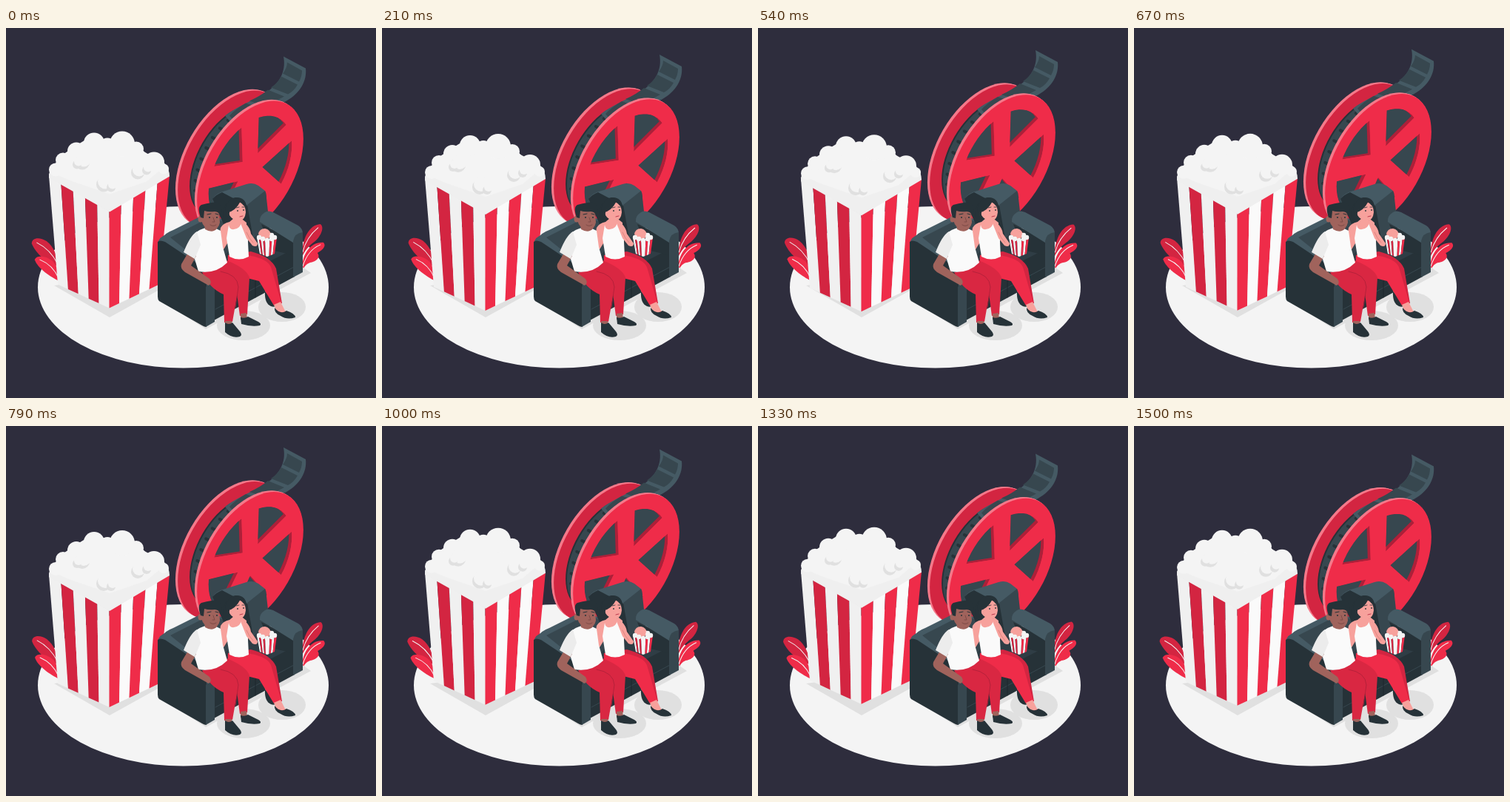
Recreate the animation shown at these times as an HTML page with a canvas. Size 500 px wide and 500 px high, loop 1.54 s.

```html
<!DOCTYPE html>
<html lang="en">
<head>
<meta charset="utf-8">
<title>Movie night</title>
<style>
html, body { margin: 0; width: 100%; height: 100%; overflow: hidden; background: #2e2d3d; }
canvas { display: block; width: 100vw; height: 100vh; object-fit: contain; }
</style>
</head>
<body>
<canvas id="stage" width="500" height="500"></canvas>
<script>
const ctx = document.getElementById('stage').getContext('2d');
const LOOP = 1540, TAU = Math.PI * 2;
const RED = '#ef2c49', DEEP = '#d32541', PINK = '#f5798a', MAROON = '#ad2039';
const INK = '#263238', COAL = '#2f3d45', SLATE = '#37474f', STEEL = '#455a64';
const PAPER = '#f4f4f4', SHADE = '#e0e0e0';
const BROWN = '#a0635c', DARK_BROWN = '#7d4a46', SKIN = '#f7a19c';

function shape(color, d) {
  ctx.fillStyle = color;
  ctx.fill(new Path2D(d));
}
function line(color, width, d) {
  ctx.strokeStyle = color;
  ctx.lineWidth = width;
  ctx.lineCap = ctx.lineJoin = 'round';
  ctx.stroke(new Path2D(d));
}
function oval(color, x, y, rx, ry = rx) {
  ctx.fillStyle = color;
  ctx.beginPath();
  ctx.ellipse(x, y, rx, ry, 0, 0, TAU);
  ctx.fill();
}
function group(dx, dy, draw) {
  ctx.save();
  ctx.translate(dx, dy);
  draw();
  ctx.restore();
}
function quad(color, points) {
  shape(color, 'M' + points.map(p => p.join(' ')).join('L') + 'Z');
}
const mix = (a, b, k) => a.map((v, i) => v + (b[i] - v) * k);

// Cosine that peaks at the given time, once per loop.
const swing = (t, peak) => Math.cos(TAU * (t - peak) / LOOP);

// Striped face between a top edge (a-b) and a bottom edge (c-d).
function stripes(a, b, c, d, count, colors) {
  for (let i = 0; i < count; i++) {
    const s = i / count, e = (i + 1) / count;
    quad(colors[i % 2], [mix(a, b, s), mix(a, b, e), mix(c, d, e), mix(c, d, s)]);
  }
}

function leaves(angle) {
  const sway = (x, y, draw) => group(x, y, () => {
    ctx.rotate(angle);
    ctx.translate(-x, -y);
    draw();
  });
  sway(72, 338, () => {
    shape(DEEP, 'M71 322C57 320 40 304 35 291C35 283 46 282 55 288C65 296 69 307 71 322Z');
    line(PAPER, 1, 'M42 290Q60 299 70 319');
    shape(RED, 'M72 342C60 336 43 325 39 313C41 306 56 308 64 316C70 324 72 331 72 342Z');
    line(PAPER, 1, 'M46 313Q63 320 71 338');
  });
  sway(402, 325, () => {
    shape(DEEP, 'M400 310C400 284 410 266 425 265C431 269 426 281 418 288C410 294 404 300 400 310Z');
    line(PAPER, 1, 'M422 270Q406 283 401 303');
    shape(RED, 'M400 330C399 305 412 289 429 290C434 295 427 301 421 304C426 311 418 316 411 317C405 319 402 324 400 330Z');
    line(PAPER, 1, 'M425 293Q408 300 401 322');
  });
}

// Reel discs live in the plane of the right isometric face.
const R = 83;
const iso = (r, a) => [r * Math.cos(a) * 0.866, -r * (Math.sin(a) + Math.cos(a) / 2)];
function disc(color, dx, dy, r) {
  ctx.save();
  ctx.transform(0.866, -0.5, 0, 1, dx, dy);
  oval(color, 0, 0, r);
  ctx.restore();
}
function thickDisc(color, dx, dy) {
  for (let i = 4; i >= 0; i--) disc(i ? PINK : color, dx - i * 0.8, dy - i * 0.45, R);
}
// Wedge that narrows to a point near the hub.
function windowPath(center) {
  const p = new Path2D(), half = 0.42;
  p.moveTo(...iso(20, center));
  for (let k = -1; k <= 1; k += 0.25) p.lineTo(...iso(65, center + half * k));
  p.closePath();
  return p;
}
function windows() {
  for (let i = 0; i < 5; i++) {
    const p = windowPath((54 + i * 72) * TAU / 360);
    ctx.save();
    ctx.clip(p);
    ctx.fillStyle = MAROON;
    ctx.fill(p);
    ctx.translate(-4, -2.2);
    ctx.fillStyle = SLATE;
    ctx.fill(p);
    ctx.restore();
  }
}
function filmTail() {
  shape(STEEL, 'M375 38L405 54C407 71 397 88 379 98C352 113 336 119 310 134L296 118C310 107 328 100 346 90C369 77 379 59 375 38Z');
  shape(SLATE, 'M380 46L400 57Q400 65 396 72L374 61Q380 53 380 46Z');
  shape(SLATE, 'M372 65L394 76Q389 85 381 89L358 80Q367 74 372 65Z');
  shape(SLATE, 'M354 83L376 92Q362 100 347 104L329 98Q343 92 354 83Z');
  shape(SLATE, 'M324 101L342 107Q322 114 308 125L302 118Q310 109 324 101Z');
}
function reel() {
  group(330, 191, () => {
    thickDisc(DEEP, -26, -14);
    for (let i = 0; i <= 10; i++) disc(i === 0 ? INK : SLATE, -23 + i * 1.8, -12 + i, 68);
    for (let i = 0; i < 9; i++) {
      const [x, y] = iso(67, 1.8 + i * 0.2);
      line(INK, 4, `M${x - 17} ${y - 9}L${x - 9} ${y - 5}`);
    }
  });
  filmTail();
  group(330, 191, () => {
    thickDisc(RED, 0, 0);
    windows();
  });
}

function popcorn() {
  const left = [58, 199], right = [221, 199], front = [139.5, 247];
  const baseLeft = [70, 346], baseRight = [207, 346], baseFront = [139.5, 378];
  stripes(left, front, baseLeft, baseFront, 5, ['#f0f0f0', DEEP]);
  stripes(front, right, baseFront, baseRight, 5, [RED, '#fafafa']);
  shape('#efefef', 'M58 202L58 197Q60 188 73 181L180 163L214 182Q221 190 221 200L140 248Z');
  shape(PAPER, 'M60 194L72 174L92 160L110 149L135 150L175 154L188 168L215 186L190 207L140 224L85 205Z');
  const puffs = [[67, 191, 9], [77, 178, 10], [95, 166, 12], [119, 155, 14], [137, 160, 12],
    [157, 156, 17], [176, 163, 10], [200, 181, 14], [213, 190, 7]];
  for (const [x, y, r] of puffs) oval(PAPER, x, y, r);
  for (const [x, y, r] of [[103, 181, 10], [96, 184, 6], [178, 195, 9], [190, 192, 6], [132, 211, 10], [142, 215, 6]]) {
    oval(SHADE, x, y, r);
    oval(PAPER, x + 2, y - 4, r);
  }
}

function sofa() {
  shape(SHADE, 'M208 367L270 407L412 331L395 319Z');
  oval(SHADE, 321, 402, 36, 20);
  oval(SHADE, 373, 377, 32, 20);
  // backrest
  shape(STEEL, 'M211 284Q215 277 226 273L274 249L304 265L304 330L250 320Z');
  shape(SLATE, 'M222 283L279 254L304 268L304 330L250 320Z');
  shape(STEEL, 'M279 232Q281 226 290 222L325 211Q334 208 341 213L350 220L354 270L310 295Z');
  shape(INK, 'M279 231Q284 225 292 222L326 240Q332 245 333 254L335 290L305 290Z');
  shape(SLATE, 'M326 239L350 220Q352 223 352 230L357 275L335 290Z');
  // seat
  shape(COAL, 'M245 335L345 277L390 300L282 356Z');
  shape(INK, 'M281 354L390 298L390 336L281 395Z');
  line(SLATE, 1, 'M283 380L389 323');
  line('#1d272c', 1, 'M337 327L337 364');
  // right arm
  shape(INK, 'M345 265L389 286L389 307L358 300Z');
  shape(STEEL, 'M343 262Q342 254 350 249Q354 246 361 249L395 267Q401 271 401 278L388 290Z');
  shape(SLATE, 'M388 337L388 288Q390 277 401 276L401 330Z');
  // left arm
  shape(STEEL, 'M205 291Q207 282 217 279L273 324Q282 334 282 347L263 351Z');
  shape(INK, 'M205 289Q208 286 215 289L257 317Q270 328 271 345L271 404Q268 404 265 402L207 369Q205 367 205 363Z');
  shape(SLATE, 'M270 350Q274 344 282 347L282 397L270 404Z');
}

function woman() {
  // far leg, then near leg
  shape(DEEP, 'M303 306L331 302Q358 309 365 325L373 372L364 374L347 334L305 326Z');
  shape(SKIN, 'M350 355L359 354L361 367L353 366Z');
  shape(INK, 'M350 356Q358 363 364 374Q364 378 358 376Q349 372 350 356Z');
  shape(RED, 'M300 307Q316 302 331 308Q353 312 358 323L372 371L362 375L342 342L310 334Q298 326 300 307Z');
  shape(SKIN, 'M362 374L371 370L377 382Q389 386 389 389L367 386Z');
  shape(INK, 'M363 378Q371 388 379 382Q391 386 391 391Q380 395 371 389Q362 385 363 378Z');
  // hair
  shape(INK, 'M293 254C294 237 302 229 312 229C322 230 326 238 324 243L306 261Q297 264 293 254Z');
  // torso
  shape(SKIN, 'M302 262L308 257L317 258L318 263Q326 264 328 270L330 284L301 288L291 304Q286 290 290 270Q293 264 302 262Z');
  shape('#fafafa', 'M301 266Q302 273 308 272Q317 271 318 262L323 264Q328 279 327 289L328 309Q315 316 302 309L298 284Z');
  // face
  shape(SKIN, 'M302 247Q311 245 315 235Q324 239 324 249Q323 259 316 261Q306 260 302 253Z');
  shape(INK, 'M298 250Q310 248 317 234Q322 236 325 242Q324 229 311 229Q299 231 296 246Z');
  oval(SKIN, 304, 251, 2.3);
  oval(INK, 313, 247, 0.9);
  oval(INK, 321, 246, 0.9);
  line(INK, 0.8, 'M311 243L315 242M319 242L322 242');
  line(MAROON, 0.8, 'M316 255L320 254');
  // raised hand and forearm
  shape(SKIN, 'M325 267Q330 270 331 278L340 291Q340 297 333 294L325 284L317 264Q316 259 320 259L325 263Z');
  line('#d77d79', 0.8, 'M325 276Q328 284 334 290');
}

function snack() {
  shape(SKIN, 'M341 279Q342 271 350 271Q357 272 359 281L351 287Z');
  stripes([339, 283], [353, 289], [343, 305], [353, 309], 5, ['#f6f6f6', DEEP]);
  stripes([353, 289], [366, 283], [353, 309], [363, 305], 4, ['#f6f6f6', RED]);
  for (const [x, y] of [[342, 283], [347, 285], [353, 287], [359, 285], [363, 283], [359, 280]]) oval(PAPER, x, y, 3.2);
  shape(SKIN, 'M345 275Q352 272 357 279Q355 284 350 282Z');
}

function man() {
  // far leg, then near leg
  shape('#d92742', 'M273 325L298 314Q324 324 329 337L326 387L316 389L311 352L281 343Z');
  shape(BROWN, 'M317 386L325 385L326 393L317 394Z');
  shape(INK, 'M317 391Q323 393 327 390L341 397Q346 400 343 402Q332 404 318 400Z');
  shape('#d92742', 'M265 330Q286 326 301 331Q314 337 314 351L306 397L295 398L294 360Q275 352 265 330Z');
  line(MAROON, 0.8, 'M290 329Q313 333 314 350L310 378');
  shape(BROWN, 'M296 396L305 396L306 406L297 405Z');
  shape(INK, 'M296 398Q301 402 306 398L316 410Q320 415 316 417Q306 420 296 411Z');
  // torso
  shape('#fafafa', 'M257 276Q266 269 280 269L290 274L293 296L299 317Q283 333 260 329L252 302Z');
  shape(BROWN, 'M268 263L284 264L285 271Q279 278 269 272Z');
  shape(DARK_BROWN, 'M275 270L285 267L284 272Q279 274 275 270Z');
  // arm on the sofa
  shape(BROWN, 'M247 302L257 308L250 321L275 339Q279 345 274 348L242 330Q235 325 237 319Z');
  shape('#ececec', 'M258 275Q249 280 240 303L255 312L263 293Z');
  // head
  shape(BROWN, 'M264 247Q274 241 288 247L289 263Q287 273 278 273Q267 272 264 260Z');
  oval(BROWN, 263, 258, 3.5, 4.5);
  shape(INK, 'M263 256Q258 242 264 239Q271 237 278 236Q287 234 290 240Q293 247 289 254Q288 248 282 248Q274 249 268 247L267 257Z');
  oval(INK, 275, 256, 1);
  oval(INK, 285, 256, 1);
  line(INK, 1, 'M272 252L277 251M283 251L287 252');
  line(DARK_BROWN, 1, 'M280 256L282 262L279 262M276 266Q280 269 284 266');
}

function render(now) {
  const t = now % LOOP;
  const boxSwing = -swing(t, 1210);
  shape('#2e2d3d', 'M0 0H500V500H0Z');
  oval(PAPER, 239.5, 350.3, 196.5, 109.2);
  leaves(0.022 * boxSwing);
  group(0, -4.4 + 4.9 * swing(t, -50), reel);
  shape(SHADE, 'M65 348L140 391L214 350L190 330Z');
  group(0, 1.4 + 4.2 * boxSwing, popcorn);
  sofa();
  woman();
  snack();
  man();
  requestAnimationFrame(render);
}
render(performance.now());
</script>
</body>
</html>
```
